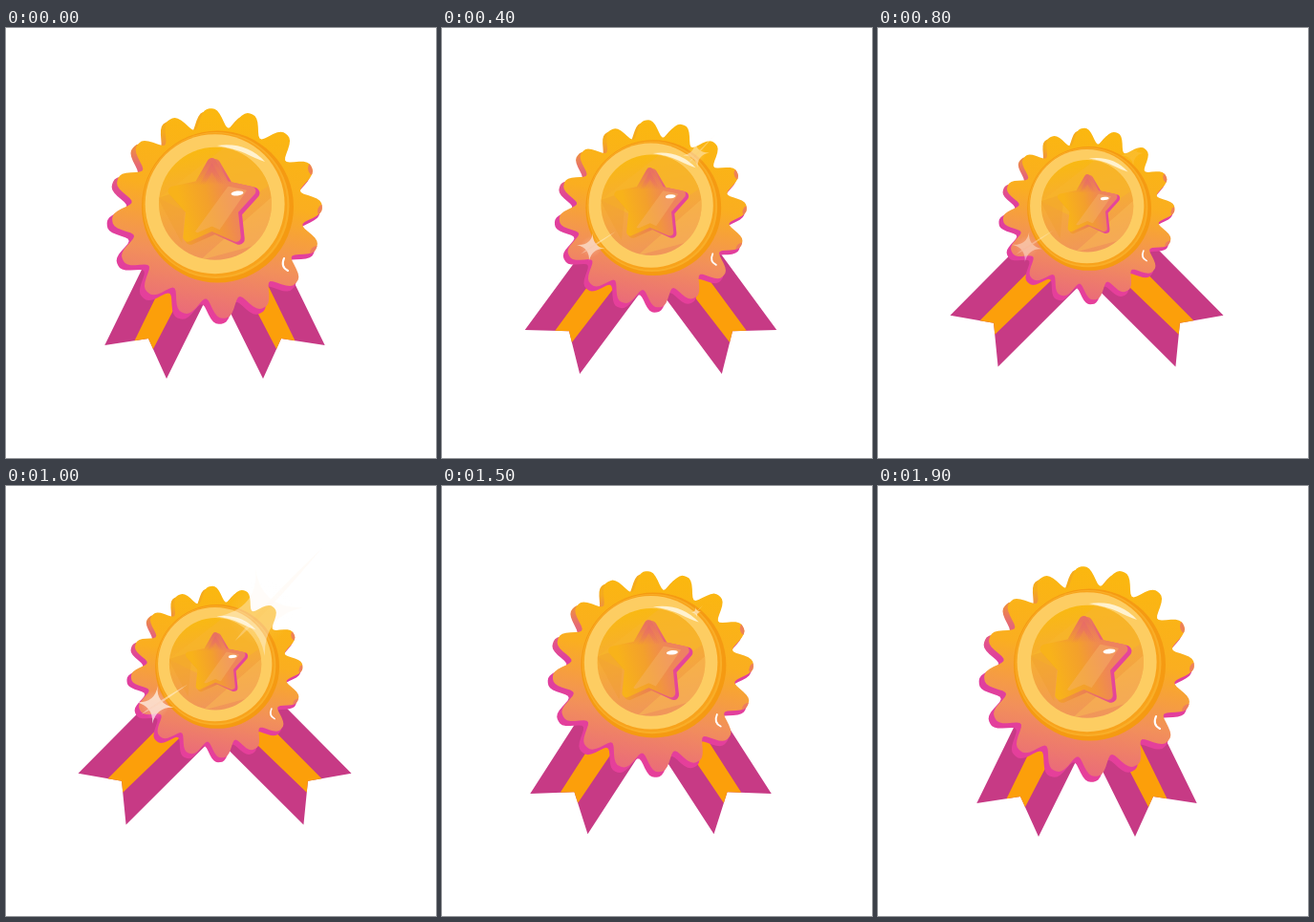
An HTML page that plays this animation: 450 px wide and 450 px high, repeating every 2000 ms.

```html
<!DOCTYPE html>
<html lang="en">
<head>
<meta charset="utf-8">
<title>Award rosette</title>
<style>
  html, body { margin: 0; width: 100%; height: 100%; overflow: hidden; background: #fff; }
  svg { display: block; width: 100vw; height: 100vh; }
</style>
</head>
<body>
<svg viewBox="0 0 450 450">
  <defs>
    <linearGradient id="face" x1=".6" y1="0" x2=".42" y2="1">
      <stop offset="0" stop-color="#fbb80e"/>
      <stop offset=".42" stop-color="#faae20"/>
      <stop offset=".72" stop-color="#f2905a"/>
      <stop offset="1" stop-color="#ea6a7a"/>
    </linearGradient>
    <linearGradient id="edge" x1=".4" y1="0" x2=".4" y2="1">
      <stop offset=".1" stop-color="#f5ab1c"/>
      <stop offset=".25" stop-color="#e66b72"/>
      <stop offset=".42" stop-color="#df3f9e"/>
      <stop offset="1" stop-color="#e63f9a"/>
    </linearGradient>
    <linearGradient id="dish" x1=".4" y1="0" x2=".6" y2="1">
      <stop offset="0" stop-color="#f9b912"/>
      <stop offset=".4" stop-color="#f6ad33"/>
      <stop offset="1" stop-color="#f0955c"/>
    </linearGradient>
    <linearGradient id="starFace" x1="0" y1=".6" x2="1" y2=".4">
      <stop offset=".1" stop-color="#f8b21a"/>
      <stop offset=".45" stop-color="#f3a02c"/>
      <stop offset=".75" stop-color="#ef8755"/>
      <stop offset="1" stop-color="#ee8064"/>
    </linearGradient>
    <linearGradient id="starEdge" x1="0" y1=".5" x2="1" y2=".5">
      <stop offset=".1" stop-color="#f3a227"/>
      <stop offset=".5" stop-color="#eb7f55"/>
      <stop offset=".85" stop-color="#e5459a"/>
    </linearGradient>
    <linearGradient id="starTop" x1="0" y1="0" x2="0" y2="1">
      <stop offset="0" stop-color="#e76b67" stop-opacity=".85"/>
      <stop offset=".3" stop-color="#e76b67" stop-opacity="0"/>
    </linearGradient>
    <radialGradient id="glow">
      <stop offset="0" stop-color="#fff" stop-opacity=".4"/>
      <stop offset="1" stop-color="#fff" stop-opacity="0"/>
    </radialGradient>
    <clipPath id="gearClip"><path class="front"/></clipPath>
    <clipPath id="dishClip"><circle cx="219" cy="183.8" r="59"/></clipPath>
    <clipPath id="starClip"><path class="star"/></clipPath>
    <g id="ribbon">
      <path fill="#c73a85" d="M103.3 332L149 325L168 367L224 254L161 214Z"/>
      <path fill="#fc9f0a" d="M134.5 327.3L149 325L154 336L207 234L184 226Z"/>
    </g>
    <g id="sparkle">
      <circle r="15" fill="url(#glow)"/>
      <path fill="#fffaf2" d="M0-20Q.5-1.5 20 0Q1.5 1.5 0 20Q-1.5 1.5-20 0Q-.5-1.5 0-20Z"/>
      <path fill="#fff3e6" opacity=".75" d="M-13 12Q0-2 31-26Q2 2-13 12Z"/>
    </g>
  </defs>

  <g id="left"><use href="#ribbon"/></g>
  <g transform="matrix(-1 0 0 1 437 0)"><g id="right"><use href="#ribbon"/></g></g>

  <g id="badge">
    <path class="back" fill="url(#edge)"/>
    <path class="front" fill="url(#face)"/>
    <g clip-path="url(#gearClip)" fill="#ec7568" opacity=".8">
      <circle cx="324" cy="147" r="8"/>
      <circle cx="334" cy="192" r="8"/>
      <circle cx="326" cy="236" r="8"/>
    </g>
    <circle cx="221.5" cy="187" r="79.5" fill="#f59a12"/>
    <circle cx="220" cy="185.5" r="76.5" fill="#f9ae28"/>
    <circle cx="219.3" cy="185" r="75" fill="#f8a31c"/>
    <circle cx="218.6" cy="184.2" r="73" fill="#fdcd62"/>
    <circle cx="219" cy="183.8" r="59" fill="url(#dish)"/>
    <g clip-path="url(#dishClip)">
      <path fill="#f8b62c" opacity=".7" d="M160 178L235 120L285 158L215 205Z"/>
      <path fill="#ed9a2c" opacity=".35" d="M159 178L189 168L184 225Z"/>
      <path fill="#f9bc55" opacity=".5" d="M203 243L286 170L270 225Z"/>
    </g>
    <path fill="#fff2cf" d="M221 123Q252 119 271 140Q262 137 250 131Q238 126 221 123Z"/>
    <path fill="none" stroke="#fff" stroke-width="2" stroke-linecap="round" d="M291 241Q287 250 295 254"/>
  </g>

  <g id="star">
    <path class="star" transform="translate(3 2)" fill="url(#starEdge)" stroke="url(#starEdge)" stroke-width="12" stroke-linejoin="round"/>
    <path class="star" fill="url(#starFace)" stroke="url(#starFace)" stroke-width="10" stroke-linejoin="round"/>
    <path class="star" fill="url(#starTop)" stroke="url(#starTop)" stroke-width="10" stroke-linejoin="round"/>
    <path clip-path="url(#starClip)" fill="#f6b164" opacity=".5" d="M198 213L238 158L252 170L216 222Z"/>
    <ellipse cx="242" cy="173" rx="6.5" ry="2.4" fill="#fff" transform="rotate(-6 242 173)"/>
  </g>

  <use id="upper" href="#sparkle"/>
  <use id="lower" href="#sparkle"/>
</svg>
<script>
  const byId = id => document.getElementById(id);
  const clamp = x => Math.min(1, Math.max(0, x));
  const smooth = x => { x = clamp(x); return x * x * (3 - 2 * x); };

  // Closed outline through points at radius(angle, index), clockwise from the top.
  function polarPath(cx, cy, count, radius) {
    const points = Array.from({ length: count }, (_, i) => {
      const a = i / count * 2 * Math.PI, r = radius(a, i);
      return `${(cx + r * Math.sin(a)).toFixed(2)} ${(cy - r * Math.cos(a)).toFixed(2)}`;
    });
    return 'M' + points.join('L') + 'Z';
  }

  // Sixteen broad, rounded teeth with narrow valleys.
  const gear = (cx, cy, outer) => polarPath(cx, cy, 256, a =>
    outer - 20 * ((1 - Math.cos(16 * (a + 0.065))) / 2) ** 1.5);

  const outlines = {
    front: gear(221, 194, 110),
    back: gear(217, 198.5, 111.5),
    star: polarPath(215.5, 184, 10, (a, i) => i % 2 ? 23.5 : 43)
  };
  for (const name in outlines)
    document.querySelectorAll('.' + name).forEach(p => p.setAttribute('d', outlines[name]));

  // Rise, hold and fall between 0 and 1.
  const swing = (t, riseEnd, fallStart, fallEnd) =>
    smooth(t / riseEnd) - smooth((t - fallStart) / (fallEnd - fallStart));

  function keyed(t, keys) {
    const i = keys.findIndex(k => k[0] > t);
    if (i < 1) return 0;
    const [t0, v0] = keys[i - 1], [t1, v1] = keys[i];
    return v0 + (v1 - v0) * smooth((t - t0) / (t1 - t0));
  }

  function scaleAbout(id, x, y, s) {
    byId(id).setAttribute('transform', `translate(${x * (1 - s)} ${y * (1 - s)}) scale(${s})`);
  }

  function placeSparkle(id, x, y, angle, scale, opacity) {
    byId(id).setAttribute('transform', `translate(${x} ${y}) rotate(${angle}) scale(${scale})`);
    byId(id).setAttribute('opacity', opacity);
  }

  const upperSize = [[200, 0], [400, .7], [600, 0], [700, 0], [1000, 2.3], [1300, 1.1], [1500, .25], [1600, 0]];
  const upperFade = [[200, 0], [400, .45], [600, 0], [700, 0], [1000, .4], [1300, .9], [1500, .6], [1600, 0]];
  const lowerSize = [[200, 0], [400, .75], [600, .6], [1000, 1], [1300, .7], [1500, 0]];
  const lowerFade = [[200, 0], [400, .6], [600, .2], [1000, .7], [1300, .85], [1500, 0]];

  function draw(t) {
    const shrink = swing(t, 715, 1000, 1735);
    const spread = 18.7 * swing(t, 750, 1055, 1800);
    for (const id of ['left', 'right'])
      byId(id).setAttribute('transform', `rotate(${spread} 184.5 232)`);
    scaleAbout('badge', 219.3, 197.3, 1 - 0.183 * shrink);
    scaleAbout('star', 227, 190, 1 - 0.32 * shrink);
    placeSparkle('upper', 266, 132, -6, keyed(t, upperSize), keyed(t, upperFade));
    placeSparkle('lower', 156, 229, 8, keyed(t, lowerSize), keyed(t, lowerFade));
  }

  const start = performance.now();
  function tick() {
    const elapsed = (performance.now() - start) % 2000;
    draw(Math.floor(elapsed / 100) * 100);
    requestAnimationFrame(tick);
  }
  tick();
</script>
</body>
</html>
```
